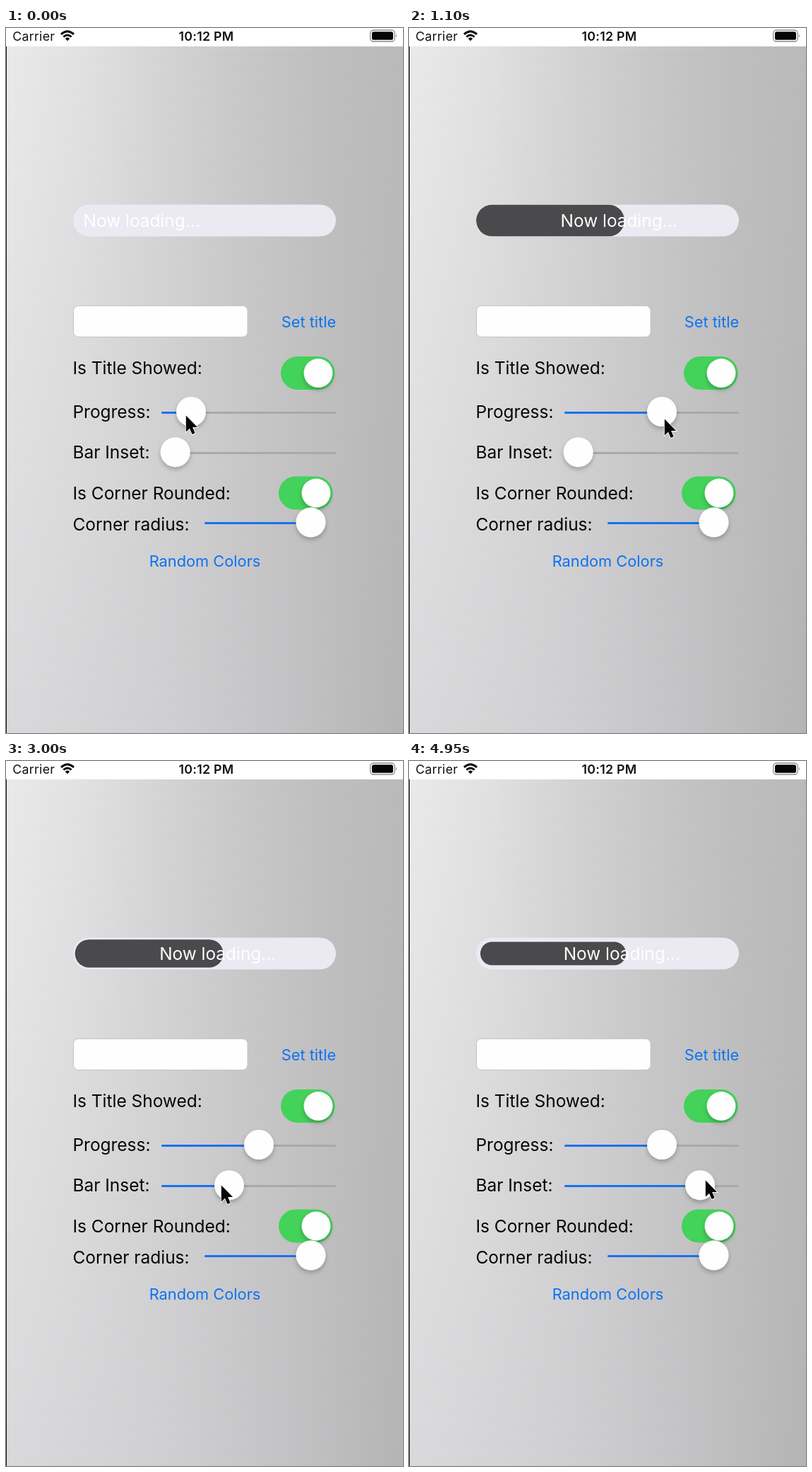
Animation of 562x996 px, one loop 5000 ms. Source, as an HTML page:

```html
<!DOCTYPE html>
<html lang="en">
<head>
<meta charset="utf-8">
<title>Progress bar settings</title>
<style>
  html, body { margin: 0; width: 100%; height: 100%; overflow: hidden; background: #fff; }
  svg { display: block; width: 100vw; height: 100vh; }
  text { font-family: Inter, "Open Sans", sans-serif; }
  .label { font-size: 24.5px; letter-spacing: -.03px; fill: #060606; }
  .button { font-size: 21.8px; fill: #0a73f2; text-anchor: middle; }
  .status { font-size: 17.8px; letter-spacing: .25px; fill: #111; }
  .rail { fill: #a9a8ab; }
  .done { fill: #1673ec; }
  .on { fill: #43d25a; }
  .thumb { fill: #fffeff; filter: url(#drop); }
</style>
</head>
<body>
<svg viewBox="0 0 562 996" preserveAspectRatio="none">
  <defs>
    <linearGradient id="top">
      <stop offset="0" stop-color="#ebeaeb"/>
      <stop offset=".2" stop-color="#e2e1e2"/>
      <stop offset=".38" stop-color="#d6d5d6"/>
      <stop offset=".6" stop-color="#c9c8c9"/>
      <stop offset=".8" stop-color="#c0bfc0"/>
      <stop offset="1" stop-color="#bbbabb"/>
    </linearGradient>
    <linearGradient id="bottom">
      <stop offset="0" stop-color="#d9d8da"/>
      <stop offset=".4" stop-color="#cfced0"/>
      <stop offset=".7" stop-color="#c3c2c4"/>
      <stop offset="1" stop-color="#b5b4b5"/>
    </linearGradient>
    <linearGradient id="fade" x2="0" y2="1">
      <stop offset="0" stop-color="#000"/>
      <stop offset="1" stop-color="#fff"/>
    </linearGradient>
    <mask id="lower"><rect y="26" width="562" height="970" fill="url(#fade)"/></mask>
    <clipPath id="pill"><rect x="95" y="249.5" width="372" height="45" rx="22.5"/></clipPath>
    <filter id="drop" x="-50%" y="-50%" width="200%" height="200%">
      <feDropShadow dx="0" dy="3.5" stdDeviation="3.2" flood-color="#000" flood-opacity=".24"/>
    </filter>
  </defs>

  <rect y="26" width="562" height="970" fill="url(#top)"/>
  <rect y="26" width="562" height="970" fill="url(#bottom)" mask="url(#lower)"/>
  <rect width="562" height="26" fill="#fff"/>
  <rect y="26" width="1" height="970" fill="#111"/>

  <!-- status bar -->
  <text class="status" x="9.3" y="17.6">Carrier</text>
  <g fill="none" stroke="#050505" stroke-width="3">
    <path d="M78 8.9Q87 .6 96 8.9"/>
    <path d="M81.4 12.5Q87 7.4 92.6 12.5"/>
  </g>
  <path d="M83.8 14.9Q87 12 90.2 14.9L87 18.3Z" fill="#050505"/>
  <text class="status" x="283.5" y="17.6" text-anchor="middle" font-weight="600">10:12 PM</text>
  <rect x="515.7" y="3" width="34.6" height="16" rx="4.5" fill="none" stroke="#8b8b8b" stroke-width="1.3"/>
  <rect x="518" y="5.2" width="30" height="11.6" rx="2.6" fill="#050505"/>
  <path d="M552 8.5Q554.2 11 552 13.5Z" fill="#8b8b8b"/>

  <!-- progress bar -->
  <rect x="95" y="249.5" width="372" height="45" rx="22.5" fill="#ebeaf3"/>
  <g clip-path="url(#pill)"><rect id="fill" fill="#4a494b"/></g>
  <text id="title" y="281" font-size="24.4" fill="#fff">Now loading...</text>

  <!-- settings -->
  <rect x="95.5" y="392.5" width="246.5" height="44" rx="7" fill="#fffeff" stroke="#c3c2c5"/>
  <text class="button" x="428.5" y="423">Set title</text>
  <text class="label" x="94.5" y="489">Is Title Showed:</text>
  <text class="label" x="94.5" y="550.5">Progress:</text>
  <text class="label" x="94.5" y="608">Bar Inset:</text>
  <text class="label" x="94.5" y="666">Is Corner Rounded:</text>
  <text class="label" x="94.5" y="709.5">Corner radius:</text>
  <text class="button" x="281.5" y="760.5">Random Colors</text>

  <rect class="on" x="389" y="464" width="76.5" height="47" rx="23.5"/>
  <circle class="thumb" cx="442" cy="487.5" r="20.4"/>
  <rect class="on" x="386" y="633.5" width="76.5" height="47" rx="23.5"/>
  <circle class="thumb" cx="439" cy="657" r="20.4"/>

  <g id="progress">
    <rect class="rail" x="220" y="542" width="247" height="3" rx="1.5"/>
    <rect class="done" x="220" y="542" height="3" rx="1.5"/>
    <circle class="thumb" cy="542" r="21"/>
  </g>
  <g id="inset">
    <rect class="rail" x="220" y="599" width="247" height="3" rx="1.5"/>
    <rect class="done" x="220" y="599" height="3" rx="1.5"/>
    <circle class="thumb" cy="599.2" r="21"/>
  </g>
  <rect class="done" x="281" y="698" width="150" height="3" rx="1.5"/>
  <circle class="thumb" cx="431.5" cy="698.3" r="21"/>

  <path id="cursor" d="M.8 1.6V24.6L6 19.7L9.6 28L13.6 26.2L10.1 18.1H17Z"
        fill="#050505" stroke="#fff" stroke-width="1.7" paint-order="stroke"/>
</svg>
<script>
const LOOP = 5000, STEP = 50;
const $ = id => document.getElementById(id);
const set = (el, attrs) => { for (const k in attrs) el.setAttribute(k, attrs[k]); };

// Monotone cubic curve through [time, value] points
function curve(pts) {
  const n = pts.length - 1;
  const rise = i => (pts[i + 1][1] - pts[i][1]) / (pts[i + 1][0] - pts[i][0]);
  const slope = pts.map((_, i) => {
    if (i === 0 || i === n) return 0;
    const a = rise(i - 1), b = rise(i);
    return a * b <= 0 ? 0 : 2 * a * b / (a + b);
  });
  return t => {
    if (t <= pts[0][0]) return pts[0][1];
    if (t >= pts[n][0]) return pts[n][1];
    let i = 0;
    while (t > pts[i + 1][0]) i++;
    const [t0, a] = pts[i], [t1, b] = pts[i + 1];
    const h = t1 - t0, u = (t - t0) / h, v = 1 - u;
    return v * v * ((1 + 2 * u) * a + u * h * slope[i]) +
           u * u * ((3 - 2 * u) * b - v * h * slope[i + 1]);
  };
}

const progressX = curve([[0, 262], [300, 314], [650, 351], [1000, 358]]);
const insetX = curve([[2400, 239.7], [2750, 270], [3000, 316], [3300, 345], [3850, 378], [4450, 412]]);
const amount = curve([[0, 0], [300, 74], [550, 142], [650, 158], [850, 187], [1100, 210], [1350, 213]]);
const cursorX = curve([[0, 254], [300, 313], [650, 354], [1000, 361], [1400, 361], [2200, 230],
  [2400, 230], [2750, 262], [3000, 304], [3300, 338], [3850, 378], [4450, 419]]);
const cursorY = curve([[0, 546], [650, 550], [1000, 551], [1400, 551], [2200, 599],
  [2400, 599], [3000, 598], [3850, 595], [4450, 591]]);

function slide(id, x) {
  const g = $(id);
  set(g.querySelector(".done"), { width: x - 220 });
  set(g.querySelector(".thumb"), { cx: x });
}

function draw(t) {
  const knob = insetX(t);
  const inset = (knob - 239.7) / 207.3 * 7.2;
  const w = (371 - 2 * inset) * amount(t) / 371;
  const h = 45 - 2 * inset, x = 95 + inset;
  set($("fill"), { x, y: 249.5 + inset, width: w, height: h, rx: Math.min(w, h) / 2 });
  set($("title"), { x: x + 14.6 + w / 2 });
  slide("progress", progressX(t));
  slide("inset", knob);
  set($("cursor"), { transform: `translate(${cursorX(t)} ${cursorY(t)})` });
}

function tick() {
  const t = performance.now() % LOOP;
  draw(Math.floor(t / STEP) * STEP);
  requestAnimationFrame(tick);
}
tick();
</script>
</body>
</html>
```
